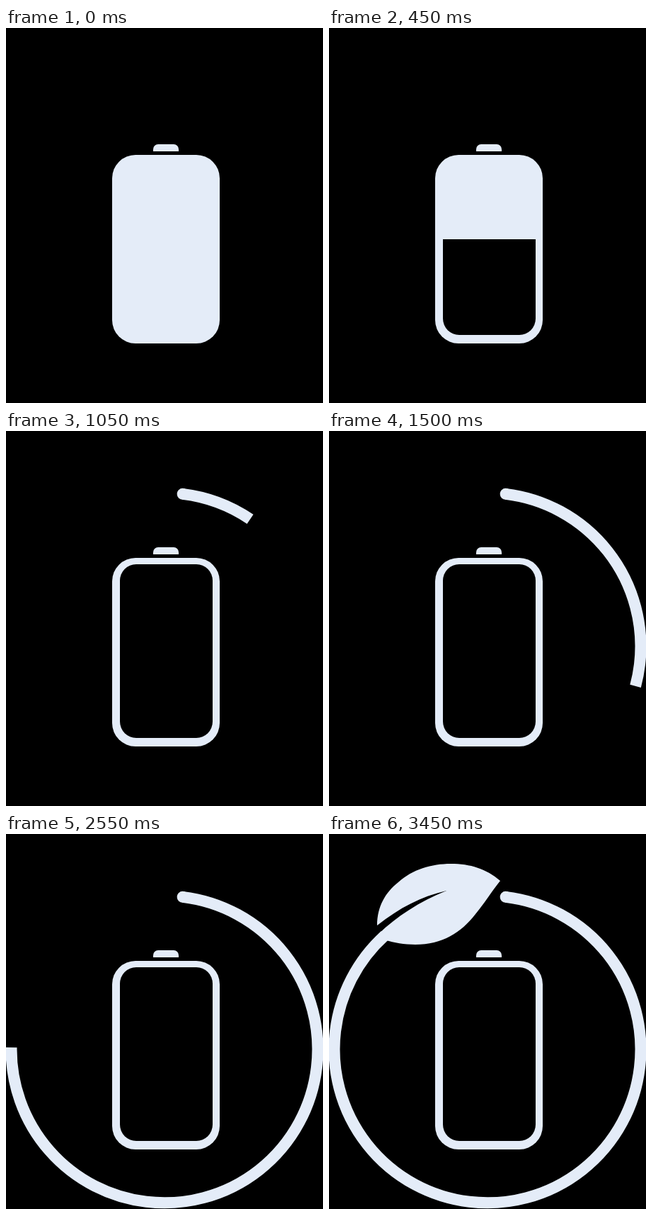
Recreate the animation shown at these times as an HTML page with a canvas. Size 448x529 px, loop 3500 ms.

```html
<!DOCTYPE html>
<html lang="en">
<head>
<meta charset="utf-8">
<title>Battery and leaf</title>
<style>
  html, body { margin: 0; width: 100%; height: 100%; overflow: hidden; background: #000; }
  canvas { display: block; }
</style>
</head>
<body>
<canvas id="stage" width="448" height="529"></canvas>
<script>
const ctx = document.getElementById('stage').getContext('2d');
const WIDTH = 448, HEIGHT = 529;
const LOOP = 3500, STEP = 50;
const PALE = '#e4ecf8';

const ring = { x: 224, y: 303.8, radius: 216.5, width: 16, start: 6.8, end: 318 };
const well = { x: 161, top: 188, bottom: 433, width: 131, radius: 23 };

const leaf = new Path2D(
  'M68 129 C68 102 80 82 98 68 C118 50 145 42 172 42 C200 42 222 49 242 66 ' +
  'C229 82 221 96 207 113 C187 139 160 156 122 156 C106 156 92 153 80 150 ' +
  'L70 141 C95 117 128 95 166 80 C130 88 100 104 68 129 Z');

// Degrees clockwise from the top, as canvas radians.
const bearing = degrees => (degrees - 90) * Math.PI / 180;

function roundRect(x, y, w, h, radii, color) {
  ctx.fillStyle = color;
  ctx.beginPath();
  ctx.roundRect(x, y, w, h, radii);
  ctx.fill();
}

function clipped(x, y, w, h, paint) {
  ctx.save();
  ctx.beginPath();
  ctx.rect(x, y, w, h);
  ctx.clip();
  paint();
  ctx.restore();
}

function drawBattery(step) {
  roundRect(208, 164, 36, 10, [7, 7, 0, 0], PALE);
  roundRect(150, 179, 152, 266, 33, PALE);
  const level = Math.max(well.top, well.bottom - 15 * step);
  clipped(0, level, WIDTH, HEIGHT - level, () =>
    roundRect(well.x, well.top, well.width, well.bottom - well.top, well.radius, '#000'));
}

function drawRing(step) {
  const sweep = Math.min(ring.end, 41.9 + 7.89 * (step - 22));
  if (sweep <= ring.start) return;
  const from = bearing(ring.start);
  ctx.strokeStyle = ctx.fillStyle = PALE;
  ctx.lineWidth = ring.width;
  ctx.beginPath();
  ctx.arc(ring.x, ring.y, ring.radius, from, bearing(sweep));
  ctx.stroke();
  ctx.beginPath();
  ctx.arc(ring.x + ring.radius * Math.cos(from), ring.y + ring.radius * Math.sin(from),
    ring.width / 2, 0, 2 * Math.PI);
  ctx.fill();
}

function drawLeaf(step) {
  const edge = 68 + 15 * (step - 57);
  if (edge <= 68) return;
  clipped(0, 0, edge, HEIGHT, () => {
    ctx.fillStyle = PALE;
    ctx.fill(leaf);
  });
}

function draw(time) {
  const step = Math.floor((time % LOOP) / STEP);
  ctx.fillStyle = '#000';
  ctx.fillRect(0, 0, WIDTH, HEIGHT);
  drawBattery(step);
  drawRing(step);
  drawLeaf(step);
}

const startTime = performance.now();
function tick() {
  draw(performance.now() - startTime);
  requestAnimationFrame(tick);
}
tick();
</script>
</body>
</html>
```
